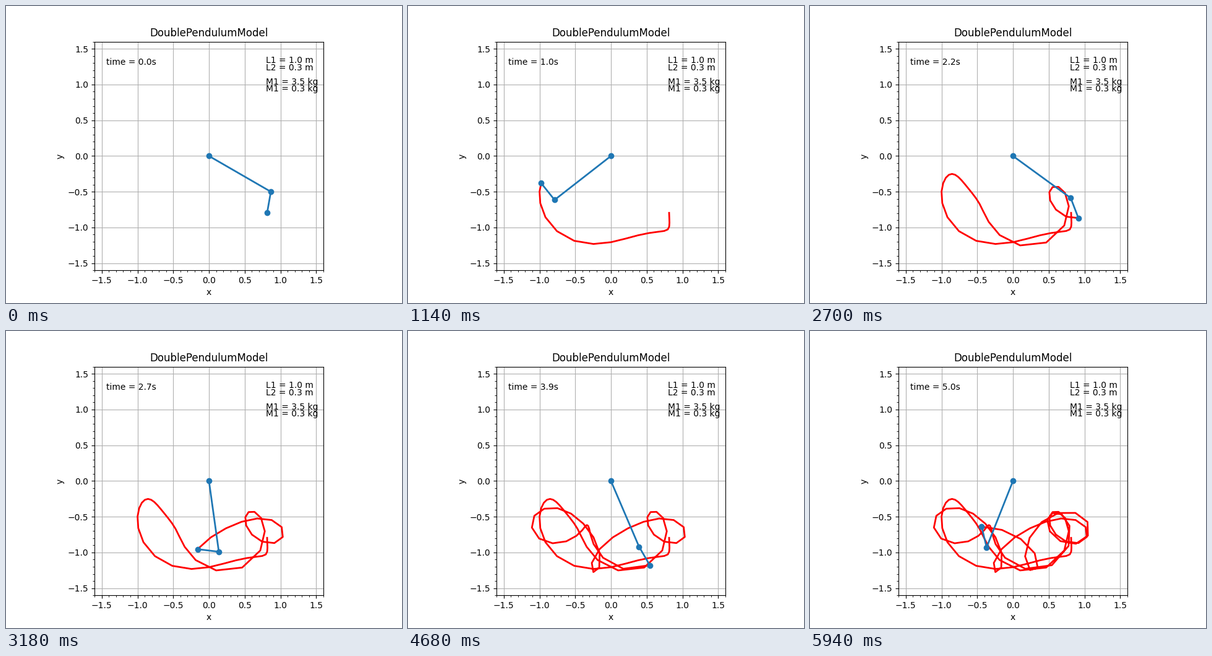
A matplotlib script for the animation above (6000 ms loop, 640 by 480 pixels).

```python
import numpy as np
import matplotlib.pyplot as plt
from matplotlib.animation import FuncAnimation

G = 9.8
L1, L2 = 1.0, 0.3
M1, M2 = 3.5, 0.3
DT = 0.05
FRAMES = 100
RTOL, ATOL = 1e-3, 1e-6

# Dormand-Prince 5(4) coefficients
A = [
    [],
    [1/5],
    [3/40, 9/40],
    [44/45, -56/15, 32/9],
    [19372/6561, -25360/2187, 64448/6561, -212/729],
    [9017/3168, -355/33, 46732/5247, 49/176, -5103/18656],
    [35/384, 0, 500/1113, 125/192, -2187/6784, 11/84],
]
E = np.array([-71/57600, 0, 71/16695, -71/1920, 17253/339200, -22/525, 1/40])
# Quartic interpolant inside one step
P = np.array([
    [1, -8048581381/2820520608, 8663915743/2820520608,
     -12715105075/11282082432],
    [0, 0, 0, 0],
    [0, 131558114200/32700410799, -68118460800/10900136933,
     87487479700/32700410799],
    [0, -1754552775/470086768, 14199869525/1410260304,
     -10690763975/1880347072],
    [0, 127303824393/49829197408, -318862633887/49829197408,
     701980252875/199316789632],
    [0, -282668133/205662961, 2019193451/616988883, -1453857185/822651844],
    [0, 40617522/29380423, -110615467/29380423, 69997945/29380423],
])


def derivs(s):
    th1, w1, th2, w2 = s
    d = th2 - th1
    sd, cd = np.sin(d), np.cos(d)
    total = M1 + M2
    den = total - M2 * cd * cd
    a1 = (M2 * L1 * w1**2 * sd * cd + M2 * G * np.sin(th2) * cd
          + M2 * L2 * w2**2 * sd - total * G * np.sin(th1)) / (L1 * den)
    a2 = (-M2 * L2 * w2**2 * sd * cd + total * G * np.sin(th1) * cd
          - total * L1 * w1**2 * sd - total * G * np.sin(th2)) / (L2 * den)
    return np.array([w1, a1, w2, a2])


def rms(v):
    return np.sqrt(np.mean(v**2))


def first_step(y, f):
    scale = ATOL + np.abs(y) * RTOL
    d0, d1 = rms(y / scale), rms(f / scale)
    h0 = 0.01 * d0 / d1
    d2 = rms((derivs(y + h0 * f) - f) / scale) / h0
    return min(100 * h0, (0.01 / max(d1, d2))**0.2)


def solve(y, times):
    """Adaptive Runge-Kutta, sampled at the given times."""
    out = np.empty((len(times), len(y)))
    out[0] = y
    t, n = 0.0, 1
    f = derivs(y)
    h = first_step(y, f)
    rejected = False
    while n < len(times):
        k = [f]
        for row in A[1:]:
            new = y + h * np.dot(row, k)
            k.append(derivs(new))
        k = np.array(k)
        scale = ATOL + np.maximum(np.abs(y), np.abs(new)) * RTOL
        err = max(rms(h * (E @ k) / scale), 1e-12)
        factor = 0.9 * err**-0.2
        if err >= 1:
            h *= max(0.2, factor)
            rejected = True
            continue
        while n < len(times) and times[n] <= t + h:
            u = (times[n] - t) / h
            out[n] = y + h * (k.T @ P @ u**np.arange(1, 5))
            n += 1
        t, y, f = t + h, new, k[-1]
        h *= min(1 if rejected else 10, factor)
        rejected = False
    return out


times = np.arange(FRAMES) * DT
states = solve(np.radians([60.0, 0.0, -10.0, 0.0]), times)
th1, th2 = states[:, 0], states[:, 2]
x1, y1 = L1 * np.sin(th1), -L1 * np.cos(th1)
x2, y2 = x1 + L2 * np.sin(th2), y1 - L2 * np.cos(th2)

fig = plt.figure(figsize=(6.4, 4.8), dpi=100)
lim = 1.6
ax = fig.add_subplot(111, xlim=(-lim, lim), ylim=(-lim, lim))
ax.set_aspect('equal')
ax.grid()
ax.minorticks_on()
ax.set_title('DoublePendulumModel')
ax.set_xlabel('x')
ax.set_ylabel('y')

ax.text(0.8, 1.3, f'L1 = {L1} m')
ax.text(0.8, 1.2, f'L2 = {L2} m')
ax.text(0.8, 1.0, f'M1 = {M1} kg')
ax.text(0.8, 0.9, f'M1 = {M2} kg')
clock = ax.text(0.05, 0.9, '', transform=ax.transAxes)

trail, = ax.plot([], [], 'r-', linewidth=2)
rods, = ax.plot([], [], 'o-', linewidth=2)


def draw(i):
    trail.set_data(x2[:i + 1], y2[:i + 1])
    rods.set_data([0, x1[i], x2[i]], [0, y1[i], y2[i]])
    clock.set_text(f'time = {times[i]:.1f}s')
    return trail, rods, clock


anim = FuncAnimation(fig, draw, frames=FRAMES, interval=60, repeat=True,
                     repeat_delay=0)
plt.show()
```
